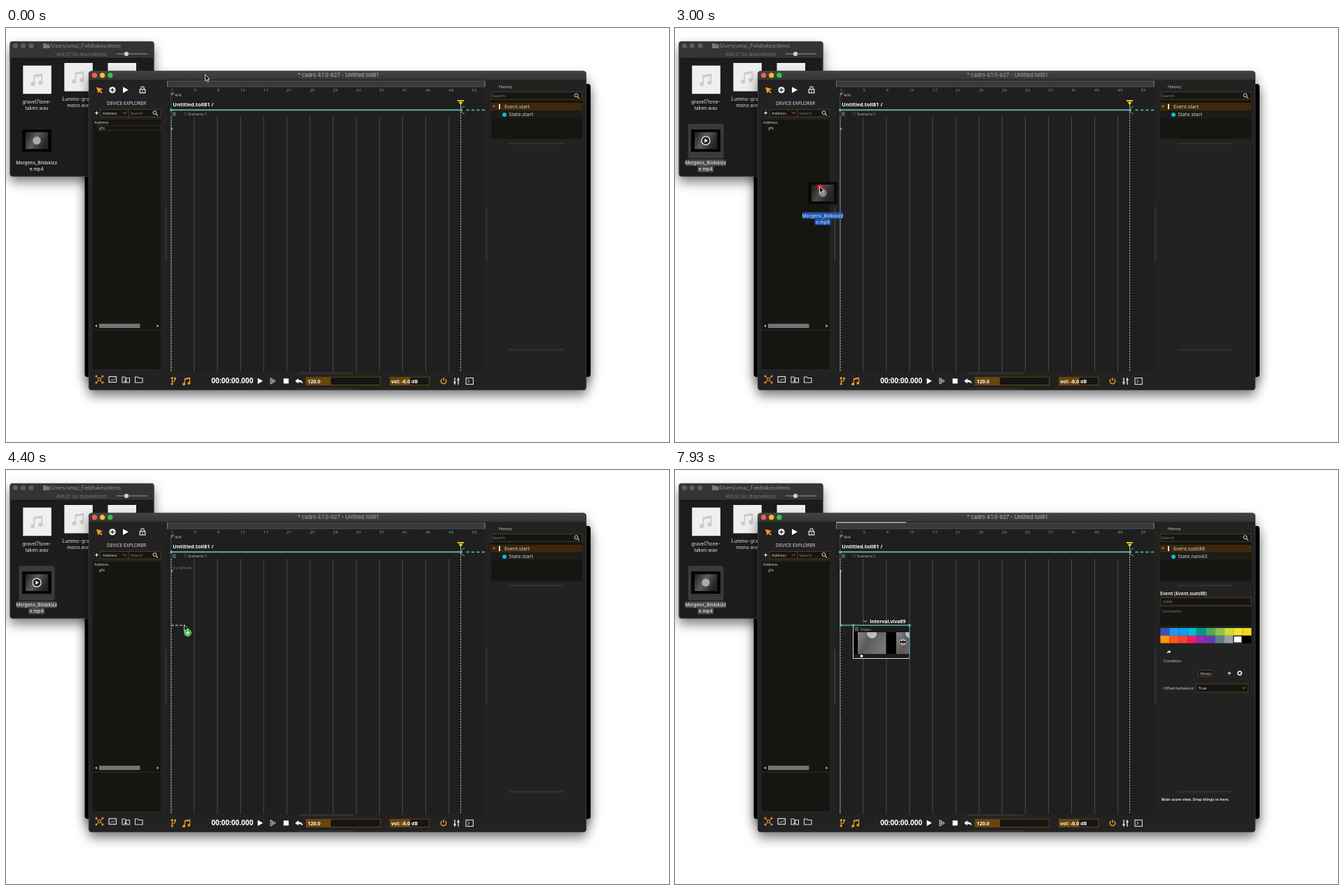
Write an HTML page that moves like this. It is 947x592 px and loops after 8 s.

```html
<!DOCTYPE html>
<html lang="en">
<head>
<meta charset="utf-8">
<title>Drop a video into the timeline</title>
<style>
html, body { margin: 0; width: 100%; height: 100%; overflow: hidden; background: #fff; }
svg { display: block; }
text { font-family: "Open Sans", "Noto Sans", sans-serif; white-space: pre; }
text.mac { font-family: Inter, "Liberation Sans", sans-serif; }
</style>
</head>
<body>
<svg width="947" height="592" viewBox="0 0 947 592">
  <defs>
    <filter id="shade" x="-20%" y="-20%" width="140%" height="150%">
      <feDropShadow dx="0" dy="8" stdDeviation="8" flood-opacity=".5"/>
    </filter>
    <linearGradient id="photo" x2="1" y2=".4">
      <stop stop-color="#1c1c1c"/><stop offset=".5" stop-color="#5c5c5c"/><stop offset="1" stop-color="#242424"/>
    </linearGradient>
    <linearGradient id="clip" x2="1" y2=".4">
      <stop stop-color="#858585"/><stop offset=".45" stop-color="#5a5a5a"/><stop offset="1" stop-color="#757575"/>
    </linearGradient>
    <linearGradient id="bar" x2="0" y2="1">
      <stop stop-color="#434343"/><stop offset="1" stop-color="#363636"/>
    </linearGradient>
  </defs>
  <g id="base"></g>
  <g id="live"></g>
</svg>
<script>
const LOOP = 8000, STEP = 200 / 3;
const TEAL = '#66aaa6', GOLD = '#f39a1e', BRONZE = '#60431a', WELL = '#151512', PALE = '#dcdcdc', RED = '#d2222a';
const FILE = ['Morgens_Bildskizz', 'e.mp4'];

// Markup helpers
const box = (x, y, w, h, fill, more = '') => `<rect x="${x}" y="${y}" width="${w}" height="${h}" fill="${fill}" ${more}/>`;
const frame = (x, y, w, h, stroke = BRONZE, fill = WELL) => box(x, y, w, h, fill, `stroke="${stroke}" stroke-width=".8"`);
const dot = (x, y, r, fill, more = '') => `<circle cx="${x}" cy="${y}" r="${r}" fill="${fill}" ${more}/>`;
const fill = (d, c, more = '') => `<path d="${d}" fill="${c}" ${more}/>`;
const line = (d, c, w = 1, more = '') => `<path d="${d}" fill="none" stroke="${c}" stroke-width="${w}" ${more}/>`;
const text = (x, y, s, size, c = PALE, more = '') => `<text x="${x}" y="${y}" font-size="${size}" fill="${c}" ${more}>${s}</text>`;
const bold = (x, y, s, size, c = '#fff') => text(x, y, s, size, c, 'font-weight="700"');
const mac = (x, y, s, size, c = '#e2e2e2') => text(x, y, s, size, c, 'class="mac" text-anchor="middle"');
const at = (x, y, inner, more = '') => `<g transform="translate(${x} ${y})" ${more}>${inner}</g>`;

const note = (x, y, c, k = 1) => `<g transform="translate(${x} ${y}) scale(${k})">` +
  line('M-4 6V-6L7-8V4', c, 1.8) + line('M-4-5L7-7', c, 2.6) + dot(-6, 6, 3, c) + dot(5, 4, 3, c) + '</g>';
const lens = (x, y) => dot(x, y, 2.5, 'none', `stroke="${PALE}"`) + line(`M${x + 2} ${y + 2}l2.4 2.4`, PALE, 1.2);
const chevron = (x, y, c, k = 2.6) => line(`M${x - k} ${y - k / 2}l${k} ${k}l${k}-${k}`, c, 1.2);
const burger = (x, y, c) => line(`M${x} ${y - 2}h5M${x} ${y}h5M${x} ${y + 2}h5`, c, .9);
const plus = (x, y, r, c, w = 1.3) => line(`M${x - r} ${y}h${2 * r}M${x} ${y - r}v${2 * r}`, c, w);
const folder = (x, y) => line(`M${x - 5} ${y + 4}v-8h4l1 1.5h5.5v6.5z`, PALE, 1.1);
const thumb = () => box(-21, -16, 42, 32, '#050505') + box(-16, -12, 32, 24, 'url(#photo)') + dot(0, 0, 5.7, '#aaa');
const caption = (x, y, plate) =>
  (plate ? box(x - 29, y - 7, 58, 9.2, plate, 'rx="2"') + box(x - 11.5, y + 2.2, 23, 9, plate, 'rx="2"') : '') +
  FILE.map((s, i) => mac(x, y + i * 9.2, s, 6.7, '#fff')).join('');

function finder() {
  let s = box(5.5, 19, 206, 193.5, '#1e1e1e', 'rx="4" filter="url(#shade)"') +
    fill('M5.5 43V23q0-4 4-4h198q4 0 4 4V43z', '#343434') +
    line('M6 43.2H211', '#101010', .7) +
    box(5.9, 19.4, 205.2, 192.7, 'none', 'rx="4" stroke="#555" stroke-width=".7"');
  for (const x of [13.5, 24.5, 36]) s += dot(x, 25.5, 3.6, '#5d5d5d');
  s += fill('M53 29v-7h3.5l1 1.3h4.5v5.7z', '#777') + mac(113, 28.2, '/Users/uma/_Fieldtakes/demo', 7.2, '#929292') +
    mac(108, 39.5, '408,37 Go disponible(s)', 6.4, '#777') +
    line('M158 37H202', '#777', 1.4) + dot(172, 37, 3.1, '#cfcfcf');
  for (const [x, y] of [[24.3, 53.7], [83.3, 50], [145.5, 50]])
    s += box(x, y, 40.5, 40.5, '#efefef') + note(x + 20, y + 20.5, '#cbcbcb');
  return s + mac(44, 107.5, 'gravel7tone-', 6.9) + mac(44, 117, 'taken.wav', 6.9) +
    mac(104, 104, 'Lummo-grains', 6.9) + mac(104, 113, 'mono.wav', 6.9);
}

function leftPanel() {
  return fill('M129 84.5l9.5 2.8-3.8 1.7 3 3-1.5 1.4-2.9-3-1.6 3.3z', GOLD) +
    dot(152, 88.6, 4.7, '#eee') + plus(152, 88.6, 2.7, '#222') +
    fill('M167 84.2l8 4.4-8 4.4z', '#fff') +
    box(191.2, 87.8, 7.6, 5, 'none', 'stroke="#eee" stroke-width="1.2"') + line('M192.8 87.5v-1.5a2.2 2.2 0 0 1 4.4 0v1.6M195 89.5v2', '#eee', 1.1) +
    text(144, 109.5, 'DEVICE EXPLORER', 6.7, '#e8e8e8') +
    plus(129.5, 121.5, 2.3, '#fff', 1) +
    frame(135, 116.5, 40, 10.5) + frame(175, 116.5, 46, 10.5) +
    text(138, 123.8, 'Address', 5.6) + chevron(169.5, 121.6, '#89511f', 2.3) +
    text(177.5, 123.8, 'Search', 5.6, '#858585') + lens(212.5, 121) +
    box(124, 131, 97, 300, WELL) + box(124, 433, 97, 55, WELL) + text(126, 137, 'Address', 5.5) +
    text(133.3, 145, 'gfx', 5.6) +
    box(133, 422.8, 58.5, 6.2, '#747474') + fill('M130 424l-3 2 3 2z', '#bbb') + fill('M215.5 424l3 2-3 2z', '#bbb') +
    line('M129 498l9 9M138 498l-9 9', GOLD, 1) + box(131.7, 500.7, 3.6, 3.6, '#212121', `stroke="${GOLD}"`) +
    [[129, 498], [138, 498], [129, 507], [138, 507]].map(p => box(p[0] - 1.3, p[1] - 1.3, 2.6, 2.6, GOLD)).join('') +
    box(147, 498.5, 10.5, 8, 'none', 'stroke="#ddd" stroke-width="1.2"') + line('M149 504.5l2-2 2 1 3-2.5', PALE, .8) +
    folder(171, 503) + dot(171, 502.5, 1.2, PALE) + fill('M168.5 506q2.5-4 5 0z', PALE) + folder(189.5, 503) +
    dot(218, 88.5, 1.3, '#191919') + dot(218, 503, 1.3, '#191919');
}

function score() {
  let s = box(230, 74, 454, 419, '#1f1f1f') + frame(230.5, 75.5, 453.5, 8.5, '#545454', '#3a3a3a') +
    line('M230.5 84v-8.5M684 84v-8.5', '#777', 1) + text(241, 98, '4/4', 6) + fill('M236 92.5h5l-5 5z', '#777');
  for (let i = 0; i < 14; i++) {
    const x = 235.7 + i * 33.08;
    s += text(x - .3, 90.6, 1 + 4 * i, 6, '#76aaa6');
    if (i < 13) s += line(`M${x} ${i ? 127 : 92}V492`, '#4b4b4b');
  }
  return s + bold(238.3, 111.7, 'Untitled.toll81 /', 7.4) +
    line('M236 127V492M649.5 112V492', '#d5d5d5', .9, 'stroke-dasharray="2.2 1.6"') +
    line('M236 117.3H650', TEAL, 2) + dot(236, 117.3, 2, TEAL) + dot(650, 117.3, 2, TEAL) +
    line('M655 112q-5 1-5 5.3t5 5.5', TEAL, 1) + line('M657.5 117.3H684', TEAL, 1.8, 'stroke-dasharray="4.2 3.2"') +
    line('M644.8 104H654', '#f2d522', 1.8) + fill('M646.5 106h6l-3 4z', '#f2d522') + line('M649.5 104V113', '#f2d522', 1) +
    burger(237.7, 123, TEAL) + dot(256, 122.6, 1.8, 'none', 'stroke="#86362c" stroke-width=".9"') +
    text(260, 125.2, 'Scenario.1', 5.55, '#bbb') + fill('M236 141.2l2.6 2.8-2.6 2.8z', TEAL);
}

function transport() {
  return line('M237.3 509.5v-9M237.3 506q4.2 0 4.2-4.5', GOLD, 1.2) + dot(237.3, 500.5, 1.6, GOLD) + dot(241.6, 501, 1.6, GOLD) + dot(237.3, 509, 1.6, GOLD) +
    note(258, 505.3, GOLD, .65) + dot(278, 505, 1.3, '#191919') +
    bold(293.3, 508.4, '00:00:00.000', 10) +
    fill('M359.6 500.6l7.4 4.2-7.4 4.2z', '#fff') +
    line('M378 500.5l7 4.3-7 4.3z', '#ddd', 1) + fill('M379.5 503l3 1.8-3 1.8z', '#ddd') +
    box(396.5, 501.2, 7.2, 7.2, '#fff') + fill('M413 504.7l4.5-3.7v2.2q6 0 6.5 5.3-2.5-2.5-6.5-2.2v2.3z', '#fff') +
    frame(428.7, 499.2, 106, 11.2, '#79500f') + box(429, 499.6, 35, 10.4, '#6b4609') + bold(431, 507.5, '120.0', 7) +
    frame(548.7, 499.2, 56, 11.2, '#79500f') + box(549, 499.6, 28.5, 10.4, '#6b4609') + bold(550.3, 507.5, 'vol: -6.0 dB', 7.1) +
    line('M622.6 502a3.8 3.8 0 1 0 4.8 0M625 500v4.5', GOLD, 1.4) +
    line('M641 500v10M646 500v10M639.3 507h3.4M644.3 503h3.4', '#eee', 1.3) +
    box(657, 500.5, 10.3, 9, 'none', 'stroke="#ddd" stroke-width="1.1"') + line('M659.5 502.7l2.3 2.3-2.3 2.3', PALE, 1) + dot(682, 505, 1.3, '#191919');
}

function base() {
  let s = box(112.5, 80, 722.5, 419, '#000', 'rx="4" filter="url(#shade)"') + finder() +
    box(118, 61.5, 711, 456.5, '#212121', 'rx="4.5" filter="url(#shade)"') +
    fill('M118 74V66q0-4.5 4.5-4.5h702q4.5 0 4.5 4.5v8z', 'url(#bar)');
  ['#fc5b57', '#fcbc2f', '#2fc840'].forEach((c, i) => s += dot(126.5 + 11.2 * i, 67.7, 3.6, c));
  s += leftPanel() + score() + transport();
  for (const r of [[227, 256, 3, 78], [684.7, 256, 3, 78], [718, 164, 79, 2.5], [718, 458.7, 79, 2.5], [417, 492.3, 80, 2.7], [417, 515, 80, 2.2]])
    s += box(...r, '#303030', 'rx="1"');
  return s + text(704, 86, 'History', 5.6) + box(693, 102, 130, 56.5, WELL) + frame(693.3, 91.7, 129.5, 10.5) +
    text(694.8, 99, 'Search', 5.8, '#858585') + lens(814.5, 96.3) +
    box(118.4, 61.9, 710.2, 455.7, 'none', 'rx="4.5" stroke="#4a4a4a" stroke-width=".7"');
}

function history(event, states, lit) {
  return box(693, 107, 130, 11, lit ? '#3e270b' : WELL) + box(693, 118.4, 130, 11, '#1b1b18') +
    fill('M695 111l4 0-2 2.6z', '#888') + box(704, 108.8, 1.8, 7.2, '#fff') + text(712, 115, event, 7.25) +
    states.map((s, i) => dot(712, 123.9 + 11.2 * i, 3, '#12bcd2') + text(718.3, 126.3 + 11.2 * i, s, 7.25)).join('');
}

const SWATCHES = ['#3f51b5', '#2196f3', '#0b9fee', '#00bcd4', '#009688', '#4caf50', '#8bc34a', '#cddc39', '#f4e02a', '#f6d821',
  '#ff9800', '#ff5722', '#f44336', '#e91e63', '#9c27b0', '#673ab7', '#607d8b', '#9e9e9e', '#fff', '#000'];
function inspector() {
  return bold(693, 178.6, 'Event (Event.suds88)', 6.5, '#e4e4e4') +
    frame(693.3, 182.7, 129.5, 11) + text(696.5, 190.4, 'Label', 5.5, '#858585') +
    box(693, 196, 130, 27, WELL) + text(695.5, 203.8, 'Comments', 5.5, '#858585') +
    SWATCHES.map((c, i) => box(693.3 + i % 10 * 13, i < 10 ? 226 : 236.8, 13, 10.8, c)).join('') +
    box(797.8, 237.3, 12, 9.8, '#fff', 'stroke="#000" stroke-width="1.2"') +
    fill('M702.5 262.5q0-3.5 3-3.5v-1.5l3 2.4-3 2.3v-1.5q-2 0-3 1.8z', '#eee') + text(698, 274.5, 'Condition', 5.5) +
    frame(747.3, 286.5, 21.7, 8) + text(750, 292.5, 'Always', 5.2) + plus(791.8, 290.5, 2.2, '#fff', 1.1) +
    dot(806.6, 290.5, 2.5, 'none', 'stroke="#eee" stroke-width="1.4"') + dot(806.6, 290.5, 3.3, 'none', 'stroke="#eee" stroke-width="1" stroke-dasharray="1.2 1.39"') +
    text(698, 313.8, 'Offset behaviour', 5.5) + frame(744.3, 306, 74, 11.3) + text(747.5, 313.8, 'True', 5.6, '#eee') + chevron(812.5, 311.6, '#89511f', 2.3);
}

function interval(end, loaded) {
  const w = end - 254.5, edge = loaded && end > 296.5 ? '#55a5bd' : '#ddd';
  let film = '';
  if (loaded) {
    film = box(0, 10, w, 31, '#000');
    for (const x of [6.5, 61.5]) film += box(x, 10, 40.5, 31, 'url(#clip)') + fill(`M${x + 13.5} 10a6.8 6.8 0 0 0 13.6 3.5l-.4-3.5z`, '#bdbdbd');
  } else film = box(0, 10, w, 31, '#191a13');
  return line('M236.3 144V222', '#ddd', 1) +
    `<svg x="254.5" y="222" width="${w}" height="48">${box(0, 0, w, 48, '#1b1b1b')}${film}${burger(2.5, 5.3, TEAL)}${text(10.2, 7.5, 'Video', 5.8, '#aaa')}</svg>` +
    line(`M254.5 222V269.5H${end}`, '#ddd', 1) + line(`M${end} 269.5V222`, edge, 1.1) +
    dot(266.5, 266, 2, '#fff') + line(`M236 222H${end}`, TEAL, 1.6) +
    [236.8, 254.8, end].map(x => dot(x, 222, 1.9, TEAL)).join('') + chevron(271.7, 216.2, '#4fb0c0') +
    `<svg x="278" y="208" width="${end - 283}" height="14">${bold(.3, 10.8, 'Interval.viva69', 6.9)}</svg>` +
    line(`M230.5 75H${end - 5}`, '#f2f2f2', 1);
}

// Keys are [time, x, y]
const POINTER = [[0, 284.5, 66.5], [70, 284, 66], [1000, 284, 66], [1270, 200, 150], [1470, 110, 204], [1530, 95, 208], [1670, 65, 156],
  [1870, 38, 151], [1930, 33, 150], [2070, 55, 151], [2200, 40, 151], [2400, 40, 151], [2470, 46, 157], [2670, 119, 210.5], [3000, 206.5, 226.5],
  [3070, 226, 229], [3270, 247, 259.5], [3330, 246, 260], [3800, 246, 260], [4070, 254.5, 221.3], [6660, 254.5, 221.3],
  [7200, 296, 243], [7600, 296, 243], [7930, 325.7, 246]];
const GHOST = [[2470, 45, 162], [2670, 102, 205.5], [3000, 211, 236], [3130, 231, 239]];
const EDGE = [[7600, 296.3, 0], [7670, 299, 0], [7930, 335, 0]];
function along(keys, t) {
  const i = keys.findIndex(k => k[0] > t);
  if (i < 0) return keys.at(-1).slice(1);
  if (!i) return keys[0].slice(1);
  const [a, b] = [keys[i - 1], keys[i]], p = (t - a[0]) / (b[0] - a[0]);
  return [1, 2].map(j => a[j] + (b[j] - a[j]) * p);
}

const arrow = () => fill('M0 0V9L2 7.2 3.5 10.5 5.1 9.8 3.7 6.6H6.4z', '#0a0a0a', 'stroke="#fff" stroke-width=".8"');
const resize = () => fill('M-6 0l3.6-3.5v2H-1V-4H1v2.5h1.4v-2L6 0 2.4 3.5v-2H1V4H-1V1.5h-1.4v2z', '#111', 'stroke="#fff" stroke-width=".8"');

function live(t) {
  const during = (a, b) => t >= a && t < b;
  const [x, y] = along(POINTER, t), picked = t >= 2470, dropped = t >= 6000, edit = t >= 7670;
  const away = during(2470, 6070), over = during(3130, 6000);
  let s = mac(474.5, 70.4, '* cadro 4.1.0-b27 - Untitled.toll81', 7.4, away ? '#a8a8a8' : '#bcbcbc');

  if (picked) s += box(18.5, 137, 51, 49.5, '#3a3a3a', 'rx="3"');
  s += at(44, 161, thumb()) + caption(43.7, 195, picked && '#4b4b4b');
  if (away) s += dot(44, 161, 6, '#252525', 'stroke="#fff" stroke-width="1.1"') + fill('M42.3 158.3l4.6 2.7-4.6 2.7z', '#fff');
  if (!away && !edit) s += box(131, 139.3, 90, 7, 'none', 'stroke="#4d3514" stroke-width=".8"');

  s += edit ? history('Event.suds88', ['State.halo43'], true) + inspector()
    : history('Event.start', dropped ? ['State.start', 'State.apes3'] : ['State.start'], !dropped);
  if (t >= 6070) s += bold(694.5, 473, 'Main score view. Drop things in here.', 5.3, '#dcdcdc');
  if (dropped) s += interval(along(EDGE, t)[0], t >= 6070);
  if (over) s += text(238.3, 142, '4 s 634 ms', 5.5, '#8d8d8d') + line(`M236 ${y + .8}H${x}`, '#ddd', 1, 'stroke-dasharray="4 2"');

  if (during(2470, 3130)) {
    const [gx, gy] = along(GHOST, t);
    s += at(gx, gy, thumb(), 'opacity=".75"') + at(gx, gy, caption(0, 34.5, '#1c62c9'), 'opacity=".88"');
  }
  if (during(2470, 4000) || edit) s += dot(x + (edit ? 0 : .8), y + (edit ? 0 : 1.2), 4.3, RED);
  if (during(4000, 4400)) {
    const p = (t - 4000) / 400, r = 50 * (1 - (1 - p) ** 2);
    s += dot(254.7, 221.5, Math.max(r - 2.5, 1), 'none', `stroke="${RED}" stroke-width="5" opacity="${1 - p}"`);
  }
  s += at(x, y, t >= 7130 ? resize() : arrow());
  if (over) s += dot(x + 5, y + 11.5, 4.9, '#2fc12f', 'stroke="#d8f5d8" stroke-width=".6"') + plus(x + 5, y + 11.5, 2.6, '#fff');
  return s;
}

document.getElementById('base').innerHTML = base();
const layer = document.getElementById('live');
let start, shown = -1;
function tick(now) {
  start ??= now;
  const n = Math.floor(((now - start) % LOOP + 5) / STEP) % 120;
  if (n !== shown) {
    shown = n;
    layer.innerHTML = live(Math.round(n * STEP / 10) * 10);
  }
  requestAnimationFrame(tick);
}
layer.innerHTML = live(0);
requestAnimationFrame(tick);
</script>
</body>
</html>
```
